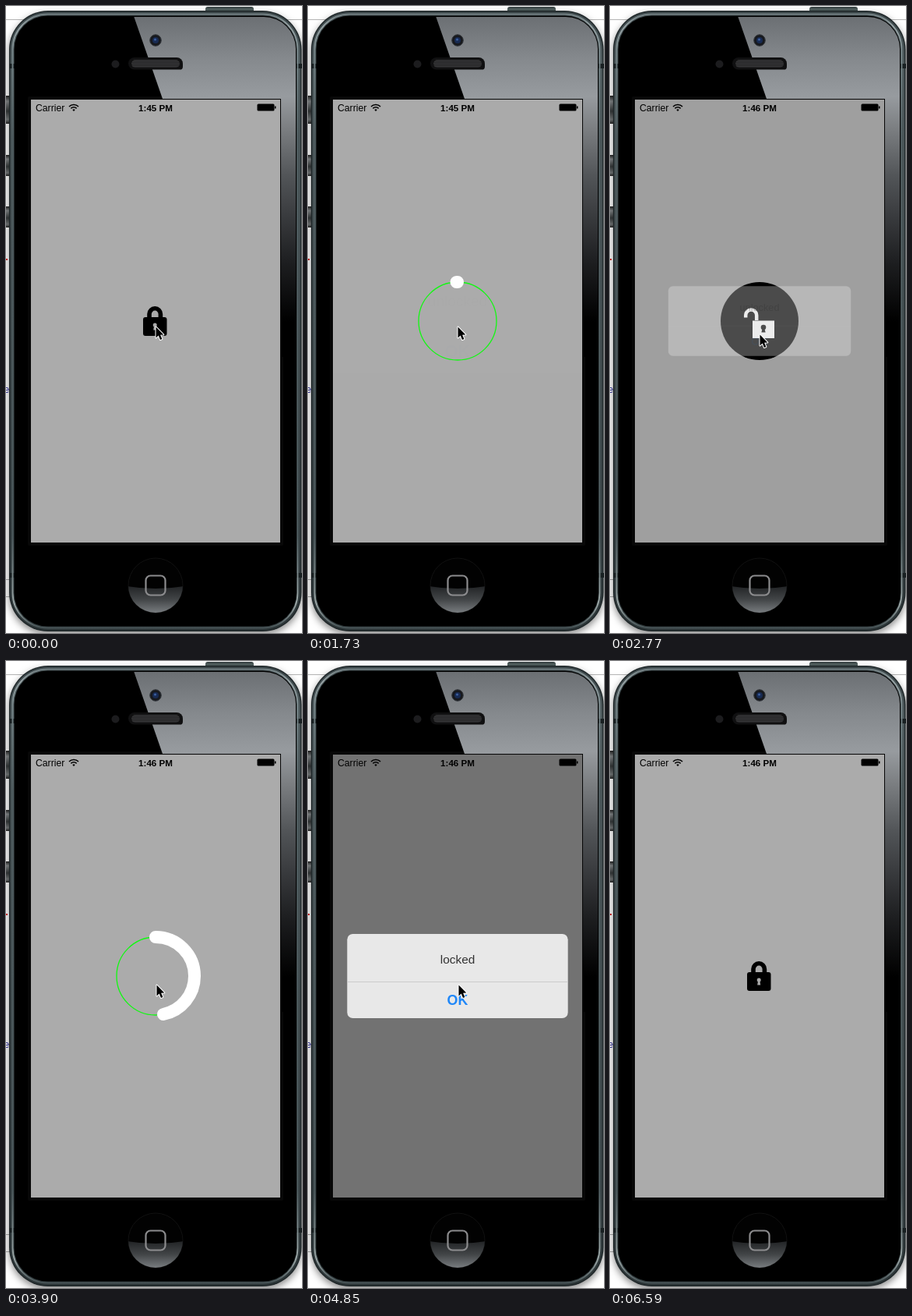
An HTML page with a canvas that plays this animation: 380 by 804 pixels, repeating every 6.9 s.

```html
<!DOCTYPE html>
<html lang="en">
<head>
<meta charset="utf-8">
<title>Lock button</title>
<style>
  html, body { margin: 0; width: 100%; height: 100%; overflow: hidden; background: #fff; }
  canvas { display: block; }
</style>
</head>
<body>
<canvas id="stage" width="380" height="804"></canvas>
<script>
const W = 380, H = 804, LOOP = 6900, STEP = 86.65;
const FONT = '"Liberation Sans", Arial, sans-serif';
const CX = 192, CY = 404, TAU = Math.PI * 2;
const UNLOCK = { press: 340, start: 285, end: 1740, alert: 1727, dismiss: 2600 };
const LOCK = { press: 3290, start: 3212, end: 4680, alert: 4675, dismiss: 5445 };
const CURSOR = [
  [0, 192, 411], [1920, 192, 411], [2420, 192, 421], [2790, 192, 421],
  [3120, 193, 415], [4880, 193, 415], [5280, 193, 421], [5470, 193, 421],
  [6150, 358, 787], [6230, 365, 800], [6420, 365, 800], [6495, 365, 802], [6580, 365, 830]
];

const stage = document.getElementById('stage').getContext('2d');
const phone = document.createElement('canvas');
phone.width = W;
phone.height = H;
let g = phone.getContext('2d');

function gradient(x0, y0, x1, y1, ...stops) {
  const fill = g.createLinearGradient(x0, y0, x1, y1);
  stops.forEach(([at, color]) => fill.addColorStop(at, color));
  return fill;
}

function rect(x, y, w, h, fill) {
  g.fillStyle = fill;
  g.fillRect(x, y, w, h);
}

function roundRect(x, y, w, h, r, fill, stroke, width = 1) {
  g.beginPath();
  g.roundRect(x, y, w, h, r);
  paint(fill, stroke, width);
}

function circle(x, y, r, fill, stroke, width = 1) {
  g.beginPath();
  g.arc(x, y, r, 0, TAU);
  paint(fill, stroke, width);
}

function polygon(points, fill, stroke, width = 1) {
  g.beginPath();
  points.forEach(([x, y]) => g.lineTo(x, y));
  g.closePath();
  paint(fill, stroke, width);
}

function paint(fill, stroke, width) {
  if (fill) { g.fillStyle = fill; g.fill(); }
  if (stroke) { g.strokeStyle = stroke; g.lineWidth = width; g.stroke(); }
}

function text(string, x, y, size, color, weight = 'normal', align = 'left') {
  g.font = `${weight} ${size}px ${FONT}`;
  g.textAlign = align;
  g.fillStyle = color;
  g.fillText(string, x, y);
}

function drawPage() {
  rect(0, 0, W, H, '#fff');
  rect(0, 17, W, 1, '#b4b4b4');
  rect(0, 735, 12, 1, '#aaa');
  rect(0, 757, 12, 1, '#aaa');
  rect(0, 324, 2, 2, '#d22');
  text('e', -2.5, 496, 12, '#2a2a9c');
}

function drawBody() {
  roundRect(256, 1, 62, 12, 3, gradient(0, 1, 0, 8, [0, '#303a3b'], [.5, '#566463'], [1, '#2c3537']));
  for (const [y, h] of [[115, 36], [191, 27], [257, 27]]) {
    roundRect(-3, y, 10, h, 2, gradient(0, y, 0, y + h, [0, '#222'], [.2, '#85898b'], [.55, '#35393a'], [.85, '#777b7c'], [1, '#222']));
  }
  g.save();
  g.shadowColor = 'rgba(0,0,0,.45)';
  g.shadowBlur = 10;
  g.shadowOffsetY = 4;
  roundRect(4, 6, 375.5, 796, 50, '#1f2729');
  g.restore();
  roundRect(5.5, 7.5, 372.5, 793, 48.5, gradient(0, 7, 0, 801, [0, '#3d484b'], [.08, '#4c585b'], [.9, '#333d40'], [1, '#2c3537']));
  for (const y of [74, 727]) {
    rect(4, y, 9, 6, '#192022');
    rect(372, y, 8, 6, '#192022');
  }
  roundRect(8.5, 10.5, 366, 787, 45, null, gradient(0, 10, 0, 798, [0, '#6f7c7f'], [.02, '#98a3a5'], [.06, '#78878a'], [.2, '#4e5b5e'], [.85, '#4e5b5e'], [.96, '#9ba6a6'], [1, '#465255']), 1.8);
  roundRect(10.5, 12.5, 362.5, 783, 43, '#000');
}

function drawGlass() {
  // A faint raised edge surrounds the display where the glass is black.
  roundRect(28, 116, 328, 576, 2, '#080808');
  g.save();
  g.beginPath();
  g.roundRect(12, 14, 360, 780, 41);
  g.clip();
  polygon([[164, 13], [380, 13], [380, 450], [318, 450], [201, 119]],
    gradient(0, 14, 0, 405, [0, '#6b6f73'], [.13, '#84888c'], [.26, '#979b9f'], [.36, '#7d8083'], [.52, '#525558'], [.8, '#1e1f21'], [1, '#000']));
  g.restore();
  rect(31, 119, 322, 570, '#050505');
}

function drawSensors() {
  circle(192, 44, 7.3, '#17191d', '#34383d');
  circle(192, 44, 4, '#182b52');
  circle(191.5, 43, 1.6, '#3a5c9c');
  circle(140.5, 74.5, 5, '#1c1c1e');
  roundRect(157, 66, 70, 15.5, [8, 8, 4, 8], '#101011');
  g.save();
  g.beginPath();
  g.roundRect(161, 69, 62, 10, 5);
  g.clip();
  rect(160, 68, 64, 12, '#252526');
  for (let y = 69; y < 80; y += 2) {
    for (let x = 161 + y % 4 / 2; x < 224; x += 2) rect(x, y, 1, 1, '#4b4b4c');
  }
  g.restore();
}

function drawHomeButton() {
  circle(192, 743, 35, '#020202', '#111', 1);
  g.save();
  g.beginPath();
  g.arc(192, 743, 35, 0, TAU);
  g.clip();
  g.beginPath();
  g.moveTo(156, 744);
  g.quadraticCurveTo(192, 750, 228, 744);
  g.lineTo(228, 779);
  g.lineTo(156, 779);
  g.closePath();
  paint(gradient(0, 744, 0, 778, [0, '#222426'], [.5, '#424547'], [1, '#787c7f']));
  g.restore();
  roundRect(179.5, 730.5, 25, 25, 6, null, '#8c8c8e', 2.2);
}

function drawStatusBar(clock) {
  text('Carrier', 38, 134.5, 12.2, '#000');
  text(clock, CX, 134.5, 11.6, '#000', 'bold', 'center');
  g.save();
  g.beginPath();
  g.moveTo(87, 135);
  g.arc(87, 135, 12, -Math.PI * .75, -Math.PI * .25);
  g.closePath();
  g.clip();
  circle(87, 134, 1.8, '#000');
  circle(87, 135, 5.2, null, '#000', 1.6);
  circle(87, 135, 8.5, null, '#000', 1.7);
  g.restore();
  roundRect(322.5, 125.5, 22, 9, 1.5, '#000');
  rect(345, 128.5, 1.5, 3, '#000');
}

function drawKeyhole(x, y, r, color) {
  circle(x, y, r, color);
  polygon([[x - 1, y], [x + 1, y], [x + r * .8, y + 6.5], [x - r * .8, y + 6.5]], color);
}

function drawClosedLock() {
  roundRect(176, 399, 30.5, 24, 3, '#000');
  g.beginPath();
  g.moveTo(184, 401);
  g.lineTo(184, 395);
  g.arc(191.2, 395, 7.2, Math.PI, 0);
  g.lineTo(198.4, 401);
  paint(null, '#000', 5.6);
  drawKeyhole(191.2, 409, 2.5, '#aaa');
}

function drawOpenLock() {
  circle(CX, CY, 50, '#000');
  g.beginPath();
  g.moveTo(174.2, 399.5);
  g.lineTo(174.2, 396.5);
  g.arc(181.2, 396.5, 7, Math.PI, 0);
  g.lineTo(188.2, 403);
  paint(null, '#fff', 4.5);
  rect(183, 403.5, 28, 22.5, '#fff');
  drawKeyhole(197, 412, 3.3, '#000');
}

function drawRing(from, to) {
  circle(CX, CY, 50, null, '#10fa10', 1.3);
  g.beginPath();
  g.arc(CX, CY, 50, from * TAU - TAU / 4, Math.max(to, from + .0005) * TAU - TAU / 4);
  g.lineCap = 'round';
  paint(null, '#fff', 16);
  g.lineCap = 'butt';
}

const progress = (t, { start, end }) => Math.min(1, Math.max(0, (t - start) / (end - start)));

function drawControl(t) {
  if (t >= UNLOCK.press && t < UNLOCK.end) drawRing(progress(t, UNLOCK), 1);
  else if (t >= LOCK.press && t < LOCK.end) drawRing(0, progress(t, LOCK));
  else if (t >= UNLOCK.end && t < LOCK.press) drawOpenLock();
  else drawClosedLock();
}

// Critically damped spring from 0 to 1.
function spring(ms) {
  const x = Math.max(0, ms) * .0183;
  return 1 - (1 + x) * Math.exp(-x);
}

function drawAlert(t, message, phase) {
  if (t < phase.alert || t > phase.dismiss + 520) return;
  const shown = spring(t - phase.alert);
  const gone = spring(t - phase.dismiss);
  const scale = 1 + .3 * (1 - shown) - .16 * gone;
  rect(32, 120, 320, 568, `rgba(0,0,0,${.4 * shown * (1 - gone)})`);
  g.save();
  g.globalAlpha = Math.min(1, shown * 1.21) * Math.pow(1 - gone, .65);
  g.translate(CX, CY);
  g.scale(scale, scale);
  roundRect(-135, -51.5, 270, 103, 7, '#e8e8e8');
  text(message, 0, -15, 14.7, '#333', 'normal', 'center');
  g.globalAlpha *= 1 - gone;
  rect(-135, 6.8, 270, .8, '#c6c6c8');
  text('OK', 0, 35.5, 17, '#1f87f8', 'bold', 'center');
  g.restore();
}

function drawCursor(t) {
  const next = CURSOR.findIndex(([time]) => time > t);
  const b = CURSOR[next < 0 ? CURSOR.length - 1 : next];
  const a = next < 0 ? b : CURSOR[next - 1];
  const k = a === b ? 0 : (t - a[0]) / (b[0] - a[0]);
  g.save();
  g.translate(a[1] + (b[1] - a[1]) * k, a[2] + (b[2] - a[2]) * k);
  g.lineJoin = 'round';
  const arrow = [[.5, .5], [.5, 14.5], [3.7, 11.6], [6, 17], [8.4, 16], [6.1, 10.7], [10.3, 10.5]];
  polygon(arrow, null, '#fff', 2);
  polygon(arrow, '#000');
  g.restore();
}

function render(t) {
  g.drawImage(phone, 0, 0);
  g.save();
  g.beginPath();
  g.rect(32, 120, 320, 568);
  g.clip();
  rect(32, 120, 320, 568, '#ababab');
  drawStatusBar(t < 2340 ? '1:45 PM' : '1:46 PM');
  drawControl(t);
  drawAlert(t, 'unlocked', UNLOCK);
  drawAlert(t, 'locked', LOCK);
  g.restore();
  drawCursor(t);
}

drawPage();
drawBody();
drawGlass();
drawSensors();
drawHomeButton();
g = stage;

const origin = performance.now();
function tick() {
  const t = (performance.now() - origin) % LOOP;
  render(Math.floor((t + 7) / 86.5) * STEP);
  requestAnimationFrame(tick);
}
tick();
</script>
</body>
</html>
```
